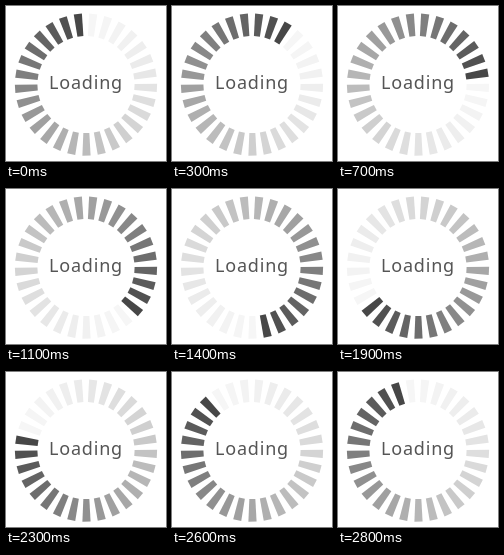
Write an HTML page with a canvas that moves like this. It is 160x155 px and loops after 2900 ms.

```html
<!DOCTYPE html>
<html lang="en">
<head>
<meta charset="utf-8">
<title>Loading</title>
<style>
  html, body { margin: 0; width: 100%; height: 100%; overflow: hidden; background: #fff; }
  canvas { display: block; }
</style>
</head>
<body>
<canvas id="stage" width="160" height="155"></canvas>
<script>
const ctx = document.getElementById('stage').getContext('2d');
const BARS = 29;
const STEP_MS = 100;
const PITCH = 2 * Math.PI / BARS;
const TILT = -0.007;
const CENTER = { x: 80, y: 78.6 };
const INNER = 48.5, OUTER = 71;
const INNER_HALF = 3, OUTER_HALF = 4.1;

// Shade by distance behind the leading bar: 0 is darkest, 1 is nearly white.
function shade(age) {
  const v = Math.round(246 - 175 * Math.pow(1 - age, 1.6));
  return `rgb(${v},${v},${v})`;
}

function drawBar(angle, color) {
  ctx.save();
  ctx.translate(CENTER.x, CENTER.y);
  ctx.rotate(angle);
  ctx.fillStyle = color;
  ctx.beginPath();
  ctx.moveTo(-INNER_HALF, -INNER);
  ctx.lineTo(-OUTER_HALF, -OUTER);
  ctx.lineTo(OUTER_HALF, -OUTER);
  ctx.lineTo(INNER_HALF, -INNER);
  ctx.fill();
  ctx.restore();
}

function draw(time) {
  const lead = Math.floor(time / STEP_MS) % BARS;
  ctx.fillStyle = '#fff';
  ctx.fillRect(0, 0, 160, 155);
  for (let i = 0; i < BARS; i++) {
    const age = (lead - i + BARS) % BARS / (BARS - 1);
    drawBar((i - 0.5) * PITCH + TILT, shade(age));
  }
  ctx.fillStyle = '#555';
  ctx.font = '500 18px "Noto Sans", "Open Sans", sans-serif';
  ctx.letterSpacing = '0.8px';
  ctx.fillText('Loading', 43, 83);
}

const start = performance.now();
function tick() {
  draw(performance.now() - start);
  requestAnimationFrame(tick);
}
tick();
</script>
</body>
</html>
```
